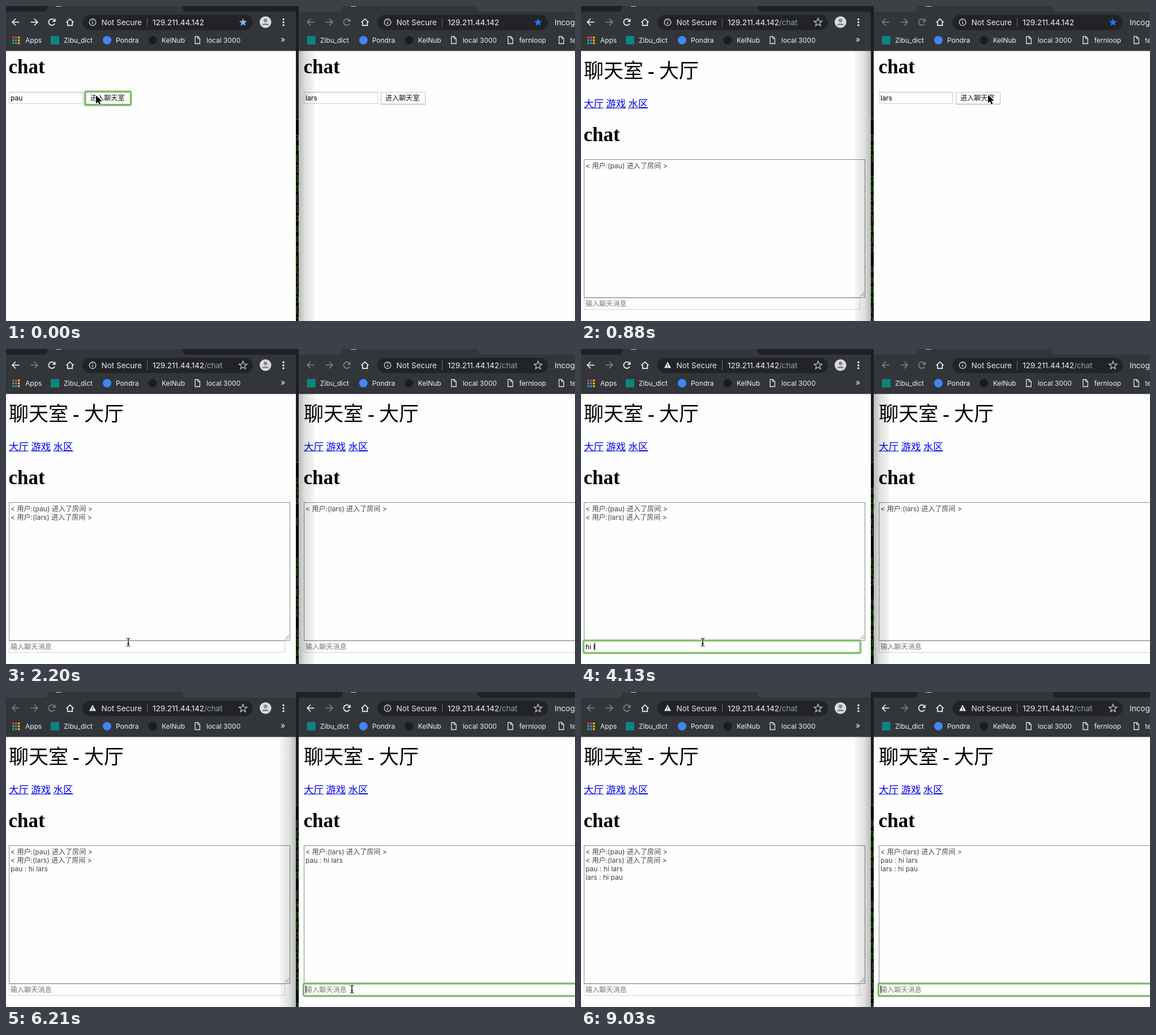
An HTML page with a canvas for the animation above (9330 ms loop, 1005 px wide and 557 px high).

```html
<!DOCTYPE html>
<html lang="zh">
<head>
<meta charset="utf-8">
<title>chat</title>
<style>
  html, body { margin: 0; width: 100%; height: 100%; overflow: hidden; background: #000; }
  canvas { display: block; width: 1005px; height: 557px; }
</style>
</head>
<body>
<canvas id="stage" width="1005" height="557"></canvas>
<script>
const ctx = document.getElementById('stage').getContext('2d');
const LOOP = 9330;
const SANS = 'Inter, "Noto Sans CJK SC", "Noto Sans CJK", sans-serif';
const SERIF = '"Liberation Serif", "Noto Sans CJK SC", "Noto Sans CJK", serif';
const UI = '12.1px ' + SANS;
const HOST = '129.211.44.142';
const USERS = ['pau', 'lars'];
const entered = name => `< 用户:(${name}) 进入了房间 >`;
const TOOLBAR = '#323539', DIM = '#7d8084', LIGHT = '#f1f3f4';

// Value of the last [time, value] step that has been reached
const at = (t, steps) => steps.reduce((v, s) => (t >= s[0] ? s[1] : v), null);

const pointer = [
  [0, ['arrow', 159, 158]], [300, ['arrow', 160, 158]], [440, ['arrow', 240, 168]],
  [590, ['arrow', 425, 172]], [740, ['arrow', 640, 165]], [880, ['arrow', 719, 157]],
  [1610, ['arrow', 690, 195]], [1760, ['arrow', 540, 330]], [1910, ['beam', 340, 455]],
  [2050, ['beam', 226, 515]], [2200, ['beam', 216, 518.5]], [2500, ['beam', 215, 518.5]],
  [5320, null], [5620, ['arrow', 609, 526]], [5920, ['beam', 611, 525.5]], [6660, null],
  [8440, ['beam', 650, 527]], [8590, ['arrow', 718, 540]], [8730, null]
];
const typedLeft = [[0, ''], [2950, 'h'], [3090, 'hi'], [3680, 'hi '], [4130, 'hi l'],
  [4280, 'hi la'], [4570, 'hi lars'], [4870, '']];
const typedRight = [[0, ''], [6660, 'h'], [6810, 'hi'], [7100, 'hi '], [7400, 'hi p'],
  [7540, 'hi pa'], [7690, 'hi pau'], [7990, '']];

function text(str, x, y, font, color) {
  ctx.font = font;
  ctx.fillStyle = color;
  ctx.fillText(str, x, y);
}

function box(x, y, w, h, color) {
  ctx.fillStyle = color;
  ctx.fillRect(x, y, w, h);
}

function frame(x, y, w, h, color) {
  ctx.strokeStyle = color;
  ctx.lineWidth = 1;
  ctx.strokeRect(x + .5, y + .5, w - 1, h - 1);
}

function disc(x, y, r, color) {
  ctx.fillStyle = color;
  ctx.beginPath();
  ctx.arc(x, y, r, 0, 7);
  ctx.fill();
}

function poly(points, close) {
  ctx.beginPath();
  points.forEach(([x, y]) => ctx.lineTo(x, y));
  if (close) ctx.closePath();
}

function line(points, color, width = 1.7) {
  poly(points);
  ctx.strokeStyle = color;
  ctx.lineWidth = width;
  ctx.stroke();
}

function ring(x, y, w, h) {
  for (const [width, color] of [[4.5, 'rgba(105,190,80,.4)'], [2.4, '#78b965']]) {
    ctx.beginPath();
    ctx.roundRect(x, y, w, h, 2);
    ctx.strokeStyle = color;
    ctx.lineWidth = width;
    ctx.stroke();
  }
}

function star(x, y, fill) {
  const points = Array.from({ length: 10 }, (_, i) => {
    const a = i * Math.PI / 5 - Math.PI / 2, r = i % 2 ? 3.2 : 7.4;
    return [x + r * Math.cos(a), y + r * Math.sin(a)];
  });
  poly(points, true);
  if (fill) {
    ctx.fillStyle = fill;
    ctx.fill();
  } else {
    ctx.strokeStyle = '#c4c7ca';
    ctx.lineWidth = 1.3;
    ctx.stroke();
  }
}

function navArrow(x, dir, color) {
  line([[x - 6 * dir, 28.5], [x + 6 * dir, 28.5]], color);
  line([[x + .5 * dir, 22.5], [x + 6.3 * dir, 28.5], [x + .5 * dir, 34.5]], color);
}

function reloadIcon(color) {
  ctx.beginPath();
  ctx.arc(81, 28.5, 5.6, .5, 5.4);
  ctx.strokeStyle = color;
  ctx.lineWidth = 1.8;
  ctx.stroke();
  poly([[87.5, 22], [87.5, 28], [81.5, 28]], true);
  ctx.fillStyle = color;
  ctx.fill();
}

function homeIcon() {
  line([[106.5, 29], [113, 23], [119.5, 29]], LIGHT);
  line([[108.8, 28], [108.8, 34.4], [117.2, 34.4], [117.2, 28]], LIGHT);
}

function securityIcon(warn) {
  if (warn) {
    poly([[153, 22.5], [159, 33.5], [147, 33.5]], true);
    ctx.fillStyle = LIGHT;
    ctx.fill();
    box(152.3, 26.5, 1.4, 3.5, '#202124');
    box(152.3, 31, 1.4, 1.4, '#202124');
  } else {
    ctx.beginPath();
    ctx.arc(153, 28.8, 5.8, 0, 7);
    ctx.strokeStyle = '#dadce0';
    ctx.lineWidth = 1.3;
    ctx.stroke();
    box(152.3, 28, 1.4, 4, '#dadce0');
    box(152.3, 25.4, 1.4, 1.4, '#dadce0');
  }
}

function docIcon(x) {
  line([[x - 4, 54], [x + 1, 54], [x + 4.4, 57.4], [x + 4.4, 66.5], [x - 4, 66.5], [x - 4, 53.4]], '#e8eaed', 1.3);
  line([[x + .8, 54], [x + .8, 57.8], [x + 4.4, 57.8]], '#e8eaed', 1.1);
}

function bookmarks(side) {
  const label = (str, x) => text(str, x, 64.5, '12px ' + SANS, LIGHT);
  ctx.save();
  if (side) ctx.translate(-68.3, 0);
  else {
    const colors = ['#ea4335', '#ea4335', '#fbbc04', '#34a853', '#4285f4', '#fbbc04', '#34a853', '#4285f4', '#fbbc04'];
    colors.forEach((c, i) => box(11 + i % 3 * 5, 54 + Math.floor(i / 3) * 5, 3.4, 3.4, c));
    label('Apps', 34);
    text('»', 485, 64, '14px ' + SANS, LIGHT);
  }
  box(79, 53, 15, 15, '#0c8484');
  label('Zibu_dict', 102);
  disc(178.5, 60.5, 7.5, '#4285f4');
  label('Pondra', 194);
  disc(259, 60.5, 7.5, '#191c20');
  label('KelNub', 275);
  docIcon(338);
  label('local 3000', 354);
  if (side) {
    docIcon(438);
    label('fernloop', 453.7);
    docIcon(528);
    label('test', 543.5);
  }
  ctx.restore();
}

function toolbar(w, side) {
  box(-4, 0, 520, 79.5, TOOLBAR);
  ctx.fillStyle = w.active ? '#202124' : '#3d4145';
  ctx.beginPath();
  ctx.roundRect(-20, -10, 93, 20, [0, 0, 7, 0]);
  ctx.roundRect(312, -10, 220, 20, [0, 0, 0, 7]);
  ctx.fill();
  box(88, 0, 10, 1, '#d5d7d9');

  const live = w.active ? LIGHT : DIM;
  navArrow(17.5, -1, live);
  navArrow(49.5, 1, w.active && !w.inRoom && !side ? LIGHT : DIM);
  reloadIcon(live);
  homeIcon();

  ctx.fillStyle = '#212327';
  ctx.beginPath();
  ctx.roundRect(135, 15.5, 301, 27, 13.5);
  ctx.fill();
  securityIcon(w.warn);
  text('Not Secure', 168.5, 33.5, '13.5px ' + SANS, '#e8eaed');
  box(249, 21, 1, 16, '#6b6e72');
  text(HOST, 259, 33.5, '13.5px ' + SANS, '#f1f3f4');
  if (w.inRoom) text('/chat', 259 + ctx.measureText(HOST).width, 33.5, '13.5px ' + SANS, '#9aa0a6');
  star(418.7, 29, w.inRoom ? null : side ? '#1f7cf0' : '#8ab4f8');

  if (side) text('Incognito', 448, 33.5, '13.5px ' + SANS, LIGHT);
  else {
    disc(458.3, 28.5, 10.3, '#dcdcdc');
    disc(458.3, 25.5, 3.3, '#85888c');
    ctx.fillStyle = '#85888c';
    ctx.beginPath();
    ctx.ellipse(458.3, 34, 6.2, 3.3, 0, Math.PI, 0);
    ctx.fill();
    [23.5, 28.7, 33.9].forEach(y => disc(490, y, 1.7, LIGHT));
  }
  bookmarks(side);
}

function heading(y) {
  text('chat', 4.5, y, 'bold 35px ' + SERIF, '#000');
}

function loginPage(w, name) {
  heading(119);
  frame(5, 152, 131, 21, '#d0d0d0');
  box(5, 152, 131, 1, '#b5b5b5');
  text(name, 8, 166.5, UI, '#000');
  box(141, 152, 79, 22, w.pressed ? '#dedede' : '#fff');
  frame(141, 152, 79, 22, '#c3c3c3');
  box(141, 173, 79, 1, '#a0a0a0');
  if (w.ring) ring(139.5, 151.2, 81, 24);
  text('进入聊天室', 149, 166.5, UI, '#111');
}

function roomPage(w) {
  const cjk = '500 35px "Noto Sans CJK SC", "Noto Sans CJK", sans-serif';
  text('聊天室', 5, 127, cjk, '#000');
  text('-', 118, 127, 'bold 35px ' + SERIF, '#000');
  text('大厅', 138, 127, cjk, '#000');
  ['大厅', '游戏', '水区'].forEach((name, i) => {
    const x = 5 + i * 39.2;
    text(name, x, 179, '17.5px ' + SERIF, '#0000ee');
    box(x, 180, 35, 1, '#0000ee');
  });
  heading(239);

  frame(5, 271, 497, 245, '#8c8c8c');
  w.messages.forEach((m, i) => text(m, 8, 286.5 + i * 15, UI, '#444'));
  line([[492.5, 513.5], [500, 506]], '#777', 1);
  line([[496.5, 513.5], [500, 510]], '#777', 1);

  frame(5, 516, 488, 21, '#d2d2d2');
  if (w.ring) {
    box(4, 515, 490, 23, '#fff');
    ring(4.5, 515.5, 489, 22);
  }
  text(w.typed || '输入聊天消息', 8, 530.5, UI, w.typed ? '#000' : '#757575');
  if (w.caret) box(8 + (w.typed ? Math.round(ctx.measureText(w.typed).width) : 0), 519, 1, 14, '#000');
}

function browser(x, width, side, w) {
  ctx.save();
  ctx.beginPath();
  ctx.rect(side ? 517 : 0, 0, width, 557);
  ctx.clip();
  ctx.translate(x, 0);
  box(-4, 79, 520, 478, '#fefefe');
  if (w.inRoom) roomPage(w);
  else loginPage(w, USERS[side]);
  toolbar(w, side);
  ctx.restore();
}

function shadow(from, to) {
  const g = ctx.createLinearGradient(from, 0, to, 0);
  g.addColorStop(0, 'rgba(0,0,0,.27)');
  g.addColorStop(.4, 'rgba(0,0,0,.12)');
  g.addColorStop(1, 'rgba(0,0,0,.03)');
  box(Math.min(from, to), 79, Math.abs(to - from), 478, g);
}

function terminal(t) {
  const epoch = at(t, [[0, 1], [590, 2], [1470, 3], [3240, 4], [4870, 5], [7990, 6]]);
  box(512, 0, 5, 557, '#050705');
  box(512, 0, 5, 200, '#1b1d1e');
  box(512, 200, 5, 1, '#55585a');
  ctx.save();
  ctx.beginPath();
  ctx.rect(512, 201, 5, 356);
  ctx.clip();
  for (let i = 0; i < 19; i++) {
    const n = Math.abs(Math.sin(i * 12.99 + epoch * 78.2) * 43758.5) % 1;
    if (epoch === 1 || n > .2) text('[9D0]['[Math.floor(n * 6)], 510, 238 + i * 17.9, '14px "DejaVu Sans Mono", monospace', '#2c7419');
  }
  ctx.restore();
}

function drawPointer(p) {
  if (!p) return;
  const [kind, x, y] = p;
  ctx.save();
  ctx.translate(x, y);
  if (kind === 'arrow') {
    poly([[0, 0], [0, 14.5], [3.4, 11.4], [5.8, 17], [8.3, 16], [5.9, 10.5], [10.6, 10.5]], true);
    ctx.strokeStyle = '#fff';
    ctx.lineWidth = 2;
    ctx.stroke();
    ctx.fillStyle = '#000';
    ctx.fill();
  } else {
    for (const [color, width] of [['#fff', 2.6], ['#111', 1.1]]) {
      line([[-3.5, -7], [-1, -6.5], [0, -5.5], [0, 5.5], [-1, 6.5], [-3.5, 7]], color, width);
      line([[3.5, -7], [1, -6.5], [0, -5.5], [0, 5.5], [1, 6.5], [3.5, 7]], color, width);
      line([[-2, 2.5], [2, 2.5]], color, width);
    }
  }
  ctx.restore();
}

function draw(t) {
  const active = at(t, [[0, 0], [1030, 1], [2200, 0], [6060, 1]]);
  const front = at(t, [[0, 0], [880, 1], [2200, 0], [5920, 1]]);
  const leftIn = t >= 440, rightIn = t >= 1470;
  const chat = [[4870, 'pau : hi lars'], [7990, 'lars : hi pau']].filter(m => t >= m[0]).map(m => m[1]);
  const left = {
    active: active === 0, inRoom: leftIn, warn: t >= 2950, pressed: t >= 150 && t < 300,
    ring: leftIn ? t >= 2500 && t < 5920 : true,
    typed: at(t, typedLeft), caret: t >= 2500 && t < 5320,
    messages: [entered(USERS[0]), ...(rightIn ? [entered(USERS[1])] : []), ...chat]
  };
  const right = {
    active: active === 1, inRoom: rightIn, warn: t >= 6660, pressed: t >= 1030 && t < 1320,
    ring: rightIn ? t >= 5920 : t >= 1030,
    typed: at(t, typedRight), caret: t >= 5920 && (t < 8440 || t >= 9030),
    messages: [entered(USERS[1]), ...chat]
  };
  browser(0, 512, 0, left);
  browser(521, 488, 1, right);
  terminal(t);
  if (front === 0) shadow(517, 545);
  else shadow(512, 484);
  drawPointer(at(t, pointer));
}

const start = performance.now();
function tick() {
  draw((performance.now() - start) % LOOP);
  requestAnimationFrame(tick);
}
tick();
</script>
</body>
</html>
```
